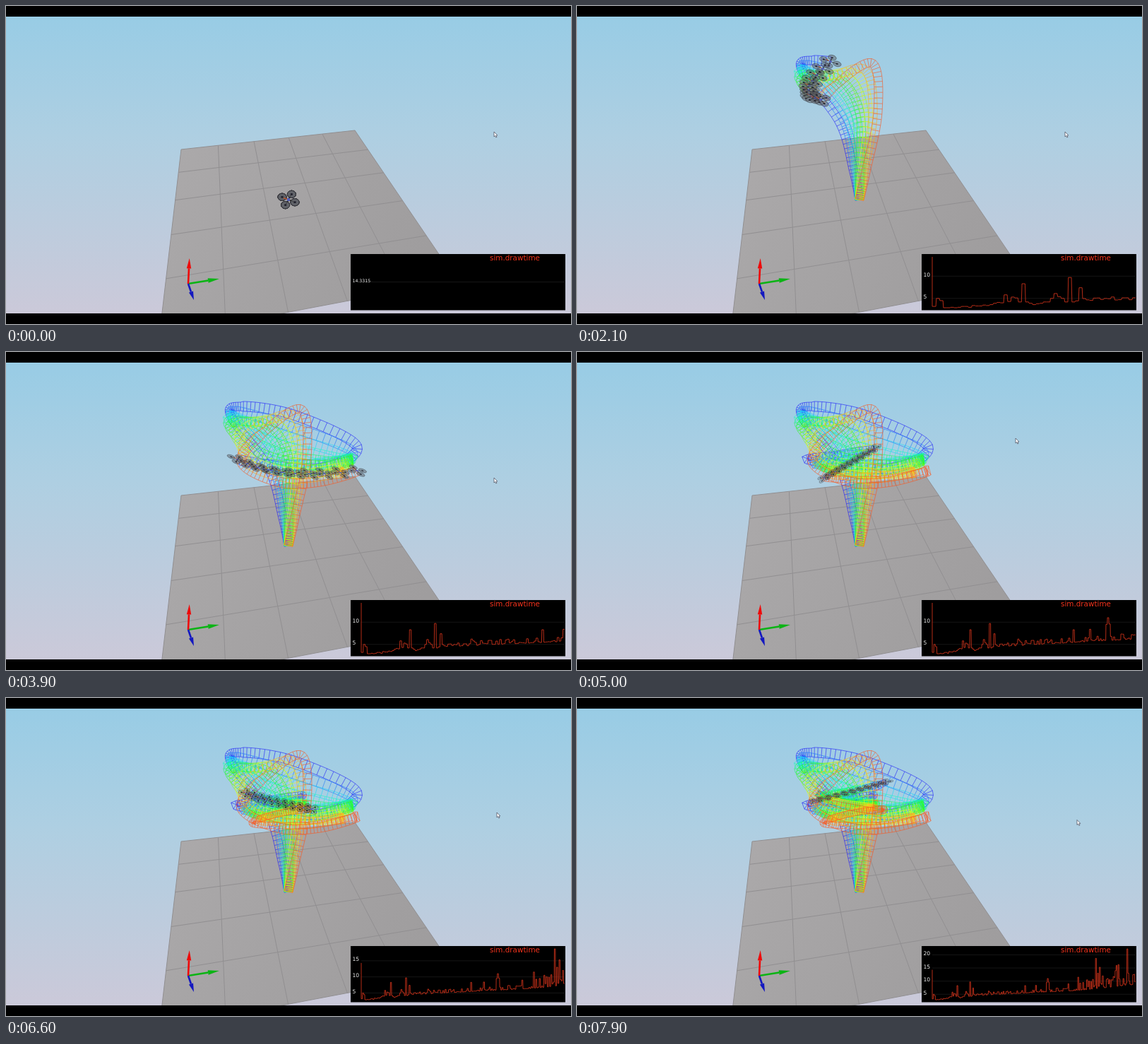
Animation of 800 by 450 pixels, one loop 8 s. Source, as an HTML page with a canvas:

```html
<!DOCTYPE html>
<html>
<head>
<meta charset="utf-8">
<style>
html, body { margin: 0; width: 100%; height: 100%; overflow: hidden; background: #000; }
canvas { display: block; }
</style>
</head>
<body>
<canvas id="stage" width="800" height="450"></canvas>
<script>
const ctx = document.getElementById('stage').getContext('2d');
const LOOP = 8000, DRONES = 10, RUNG = 42;

// time; paths of first, middle and last drone; rotor squash; rotor tilt in degrees
const KEYS = [
  [0,    400,274, 400,274, 400,274, .85, 0],
  [470,  392,235, 400,225, 409,235, .9, 0],
  [940,  372,165, 397,150, 426,150, 1, 0],
  [1400, 319,92,  365,104, 418,81,  1, 0],
  [1900, 333,77,  315,102, 362,116, .7, 20],
  [2400, 410,90,  370,142, 334,156, .5, 0],
  [2900, 497,134, 450,158, 387,184, .42, -27],
  [3400, 440,165, 490,152, 445,183, .5, 0],
  [3900, 328,152, 400,171, 497,168, .4, 20],
  [4450, 365,145, 345,162, 430,180, .5, -10],
  [5000, 421,137, 385,158, 350,178, .5, -30],
  [5800, 385,150, 425,150, 380,165, .6, 0],
  [6600, 340,135, 385,148, 432,157, .7, 10],
  [7250, 380,145, 345,140, 420,160, .5, 0],
  [7900, 437,119, 390,132, 338,145, .4, -12]
];

const path = (points, close) => {
  ctx.beginPath();
  points.forEach(p => ctx.lineTo(p[0], p[1]));
  if (close) ctx.closePath();
};
const fill = (points, color) => { path(points, true); ctx.fillStyle = color; ctx.fill(); };
const stroke = (points, color, width = 1) => {
  path(points);
  ctx.strokeStyle = color;
  ctx.lineWidth = width;
  ctx.stroke();
};

// Catmull-Rom value of one key column
function keyed(col, t) {
  let i = 0;
  while (i < KEYS.length - 2 && KEYS[i + 1][0] <= t) i++;
  const at = k => KEYS[Math.max(0, Math.min(KEYS.length - 1, k))][col];
  const s = Math.min(1, (t - KEYS[i][0]) / (KEYS[i + 1][0] - KEYS[i][0]));
  const [a, b, c, d] = [at(i - 1), at(i), at(i + 1), at(i + 2)];
  return b + s / 2 * (c - a + s * (2 * a - 5 * b + 4 * c - d + s * (3 * (b - c) + d - a)));
}

// Quadratic blend over the swarm, u from 0 to 1
function position(u, t) {
  const w = [(1 - u) * (1 - 2 * u), 4 * u * (1 - u), u * (2 * u - 1)];
  return [1, 2].map(c => w.reduce((sum, k, i) => sum + k * keyed(c + 2 * i, t), 0));
}

const hue = i => `hsl(${240 - 225 * i / (DRONES - 1)} 95% 55%)`;

// Ribbon edges for the whole flight, cut off at the current time when drawn
const ribbons = Array.from({ length: DRONES }, (_, i) => {
  const u = i / (DRONES - 1), edges = [];
  for (let t = 0; t <= 7900; t += RUNG) {
    const [x, y] = position(u, t);
    const a = position(u, Math.max(0, t - 30)), b = position(u, t + 30);
    const dx = b[0] - a[0], dy = b[1] - a[1], len = Math.hypot(dx, dy) || 1;
    const half = t < 1900 ? 6 : t < 4000 ? 7 : 4.5;
    const nx = -dy / len * half, ny = dx / len * half;
    edges.push([[x + nx, y + ny], [x - nx, y - ny]]);
  }
  return edges;
});

function drawRibbon(i, t) {
  const shown = ribbons[i].slice(0, Math.floor(t / RUNG) + 1);
  if (shown.length < 2) return;
  ctx.beginPath();
  for (const side of [0, 1])
    shown.forEach((e, k) => k ? ctx.lineTo(...e[side]) : ctx.moveTo(...e[side]));
  for (const [a, b] of shown) { ctx.moveTo(...a); ctx.lineTo(...b); }
  ctx.globalAlpha = .75;
  ctx.strokeStyle = hue(i);
  ctx.lineWidth = .8;
  ctx.stroke();
  ctx.globalAlpha = 1;
}

function drawDrone(i, t) {
  const [x, y] = position(i / (DRONES - 1), t);
  const late = Math.max(0, Math.min(1, (t - 3900) / 900));
  const size = 1 - .3 * late;
  const spin = t < 700 ? .45 : .1 + .08 * i;
  ctx.save();
  ctx.translate(x, y);
  ctx.rotate(keyed(8, t) * Math.PI / 180);
  ctx.scale(size, size * keyed(7, t));
  for (let k = 0; k < 4; k++) {
    const a = spin + k * Math.PI / 2, rx = 10 * Math.cos(a), ry = 10 * Math.sin(a);
    stroke([[0, 0], [rx, ry]], '#333', 1.2);
    ctx.beginPath();
    ctx.arc(rx, ry, 6, 0, 7);
    ctx.fillStyle = `rgba(95,98,104,${.5 - .25 * late})`;
    ctx.fill();
    ctx.strokeStyle = 'rgba(45,45,50,.75)';
    ctx.lineWidth = .7;
    ctx.stroke();
    ctx.fillStyle = '#20202c';
    ctx.fillRect(rx - 1.4, ry - 1.4, 2.8, 2.8);
  }
  stroke([[-7, -3], [0, 0]], '#d0582c', 1.2);
  ctx.fillStyle = '#5560c0';
  ctx.fillRect(-2, -2, 4, 4);
  ctx.restore();
}

// Unit square to the floor seen in perspective
const CORNERS = [[248, 203], [494, 176], [638, 388], [217, 468]];
const onFloor = (() => {
  const [a, b, c, d] = CORNERS;
  const sub = (p, q) => [p[0] - q[0], p[1] - q[1]];
  const det = (p, q) => p[0] * q[1] - p[1] * q[0];
  const e = sub(b, c), f = sub(d, c), s = sub(sub(a, b), sub(d, c));
  const g = det(s, f) / det(e, f), h = det(e, s) / det(e, f);
  return (u, v) => [0, 1].map(k =>
    (a[k] + u * (b[k] - a[k] + g * b[k]) + v * (d[k] - a[k] + h * d[k])) / (1 + g * u + h * v));
})();

function drawArrow(dx, dy, shaft, color) {
  const x = 258, y = 393, len = Math.hypot(dx, dy);
  const nx = -dy / len * 3.2, ny = dx / len * 3.2, mx = x + dx * shaft, my = y + dy * shaft;
  stroke([[x, y], [mx, my]], color, 2.6);
  fill([[mx + nx, my + ny], [x + dx, y + dy], [mx - nx, my - ny]], color);
}

function drawScene() {
  const sky = ctx.createLinearGradient(0, 15, 0, 435);
  sky.addColorStop(0, '#98cce5');
  sky.addColorStop(.4, '#aecfe2');
  sky.addColorStop(1, '#cbc9d9');
  ctx.fillStyle = sky;
  ctx.fillRect(0, 15, 800, 420);
  const floor = ctx.createLinearGradient(240, 200, 560, 400);
  floor.addColorStop(0, '#aba9aa');
  floor.addColorStop(1, '#9f9d9e');
  fill(CORNERS, floor);
  for (let k = 0; k <= 5; k++) {
    stroke([onFloor(k / 5, 0), onFloor(k / 5, 1)], '#918f91');
    stroke([onFloor(0, k / 5), onFloor(1, k / 5)], '#918f91');
  }
  drawArrow(44, -7, .64, '#0ab414');
  drawArrow(1.7, -36, .6, '#ee0a0a');
  drawArrow(8, 23, .5, '#1418c0');
}

// Timing samples: a measured start, then a noisy rise with spikes
const samples = [14.3315, 3.2, 5, 4.5, 2.9, 2.9, 3, 2.9, 3, 3.2, 3.2, 3, 3.4, 3.3, 3.3, 3.5,
  3.4, 3.6, 3.9, 4.1, 4, 5.8, 4.3, 5.3, 5.1, 4.2, 8.3, 4.2, 3.9, 3.6, 3.8, 3.9, 4.2, 4.2,
  5, 6.1, 5.4, 5, 4.2];
const spikes = { 39: 9.7, 40: 4.2, 42: 7.4, 58: 6.2, 73: 6.1, 76: 6, 95: 8.3, 106: 8.4, 117: 9.5,
  118: 11, 119: 9.6, 128: 7.3, 139: 9, 149: 11.5, 158: 10.5, 167: 18.7, 169: 13, 171: 15.3,
  174: 12, 179: 11, 187: 14, 188: 16, 190: 16.3, 195: 11, 199: 22.3, 200: 13 };
let seed = 7;
const random = () => (seed = seed * 16807 % 2147483647) / 2147483647;
for (let i = samples.length; i < 215; i++) {
  const noise = random() ** 3 * (i < 150 ? 1.3 : 4);
  samples.push(spikes[i] || 4.4 + (i - 40) * .019 + Math.max(0, i - 150) * .02 + noise);
}

function drawPanel(t) {
  ctx.fillStyle = '#000';
  ctx.fillRect(488, 351, 304, 79.5);
  const count = Math.floor(.0272 * Math.min(t, 5000) + .0248 * Math.max(0, t - 5000));
  const shown = samples.slice(0, count + 1);
  const low = Math.min(...shown), high = Math.max(...shown);
  const toY = v => count ? 427 - 72 * (v - low) / (high - low) : 390.5;
  ctx.font = '7.6px "DejaVu Sans", sans-serif';
  ctx.textBaseline = 'middle';
  const label = v => {
    const y = toY(v);
    stroke([[503, y], [791, y]], '#161616');
    ctx.fillStyle = '#eee';
    ctx.fillText(v, 490.5, y - 1.5);
  };
  if (!count) {
    ctx.font = '6.2px "DejaVu Sans", sans-serif';
    label(samples[0]);
  } else {
    for (let v = 5; v < high - 1; v += 5) if (v > low) label(v);
    const step = 288 / count, line = [[503, toY(samples[0])]];
    for (let i = 1; i <= count; i++) {
      const x = 503 + (i - 1) * step, y = toY(samples[i]);
      line.push([x + (i > 1 ? step * .15 : 0), y], [x + step, y]);
    }
    stroke(line, '#c8321a', .9);
  }
  ctx.font = '10.4px "DejaVu Sans", sans-serif';
  ctx.textBaseline = 'alphabetic';
  ctx.fillStyle = '#f2331c';
  ctx.fillText('sim.drawtime', 685, 360);
}

function drawCursor(t) {
  const stops = [[0, 691, 178], [4500, 691, 178], [5000, 621, 122], [6600, 695, 162], [7900, 708, 172.5]];
  const i = Math.max(0, Math.min(3, stops.findIndex(s => s[0] > t) - 1));
  const last = t >= 7900 ? 3 : i, [a, b] = [stops[last], stops[last + 1]];
  const s = Math.min(1, (t - a[0]) / (b[0] - a[0]));
  const x = a[1] + s * (b[1] - a[1]), y = a[2] + s * (b[2] - a[2]);
  const shape = [[0, 0], [0, 7], [1.6, 5.6], [2.8, 8], [4, 7.4], [2.9, 5.2], [4.8, 5]]
    .map(p => [x + p[0], y + p[1]]);
  fill(shape, '#fff');
  stroke([...shape, shape[0]], '#445', .7);
}

function frame(now) {
  const t = Math.floor(now % LOOP / 100) * 100;
  ctx.fillStyle = '#000';
  ctx.fillRect(0, 0, 800, 450);
  ctx.save();
  ctx.beginPath();
  ctx.rect(0, 15, 800, 420);
  ctx.clip();
  drawScene();
  for (let i = 0; i < DRONES; i++) drawRibbon(i, t);
  for (let i = 0; i < DRONES; i++) drawDrone(i, t);
  drawPanel(t);
  drawCursor(t);
  ctx.restore();
  requestAnimationFrame(frame);
}
requestAnimationFrame(frame);
</script>
</body>
</html>
```
